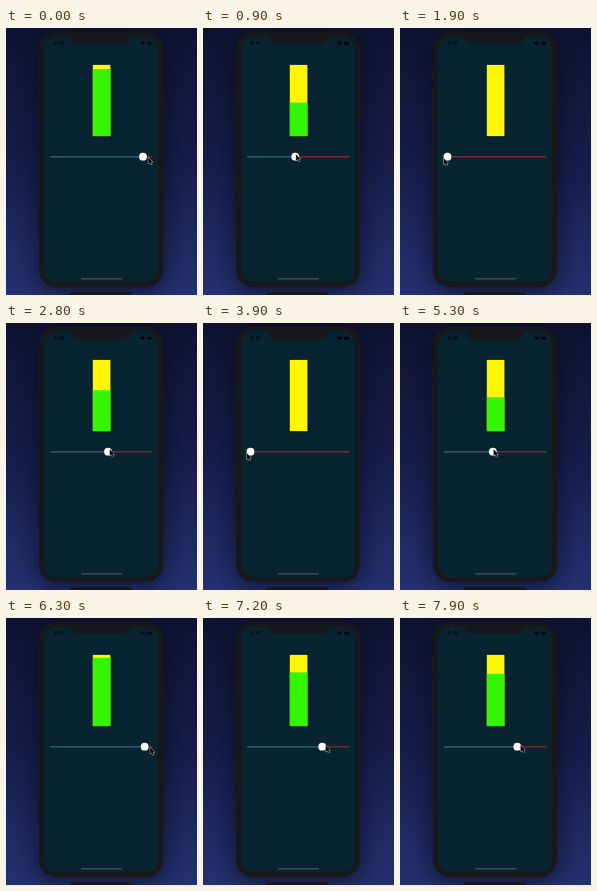
Write an HTML page with a canvas that moves like this. It is 191 px wide and 267 px high and loops after 8000 ms.

```html
<!DOCTYPE html>
<html lang="en">
<head>
<meta charset="utf-8">
<title>Slider and level bar</title>
<style>
html, body { margin: 0; width: 100%; height: 100%; overflow: hidden; background: #10143a; }
canvas { display: block; width: 191px; height: 267px; }
</style>
</head>
<body>
<canvas id="stage"></canvas>
<script>
const W = 191, H = 267, LOOP = 8000, STEP = 100;
const canvas = document.getElementById('stage');
const ratio = window.devicePixelRatio || 1;
canvas.width = W * ratio;
canvas.height = H * ratio;
const ctx = canvas.getContext('2d');
ctx.scale(ratio, ratio);

const BODY = '#17181b', INK = '#02080d';
const BAR = { x: 86.8, y: 36.9, w: 17.6, h: 71.2 };
const MIN_X = 47.5, MAX_X = 142.5, TRACK_Y = 128.7;

// turning points of the drag: time, level
const drag = [
  [0, 0.942], [1800, 0], [2000, 0], [2950, 0.647], [3800, 0], [4230, 0],
  [6450, 1], [6900, 1], [7500, 0.51], [7900, 0.735], [LOOP, 0.76]
];

// gentle ease, halfway between linear and smoothstep
const ease = u => (u + u * u * (3 - 2 * u)) / 2;

function levelAt(t) {
  const i = drag.findIndex(([time]) => time > t);
  const [t0, a] = drag[i - 1], [t1, b] = drag[i];
  return a + (b - a) * ease((t - t0) / (t1 - t0));
}

function rect(x, y, w, h, color) {
  ctx.fillStyle = color;
  ctx.fillRect(x, y, w, h);
}

function rounded(x, y, w, h, r, color) {
  ctx.beginPath();
  ctx.roundRect(x, y, w, h, r);
  ctx.fillStyle = color;
  ctx.fill();
}

function drawBackdrop() {
  const g = ctx.createLinearGradient(0, 0, 0, H);
  g.addColorStop(0, '#0e1231');
  g.addColorStop(0.5, '#151c4a');
  g.addColorStop(1, '#233171');
  rect(0, 0, W, H, g);
}

function drawStatusBar() {
  ctx.fillStyle = INK;
  ctx.font = 'bold 5px Inter, Arial, sans-serif';
  ctx.fillText('9:41', 47.5, 17.2);
  ctx.beginPath();
  ctx.moveTo(136.5, 17.5);
  ctx.arc(136.5, 17.5, 3.8, -Math.PI * 0.75, -Math.PI * 0.25);
  ctx.fill();
  rounded(141, 13.8, 5, 3, 0.8, INK);
}

function drawPhone() {
  ctx.save();
  ctx.shadowColor = 'rgba(8, 10, 24, 0.75)';
  ctx.shadowBlur = 26 * ratio;
  ctx.shadowOffsetY = 5 * ratio;
  rounded(33, 4, 124, 255, 17, BODY);
  ctx.restore();
  for (const [y, h] of [[42, 8], [60, 13], [77, 14]]) rect(32, y, 2, h, BODY);
  rect(157, 64, 1.2, 23, BODY);
  rounded(38, 9, 114, 245, 12, '#092431');
  rounded(66, 5.5, 58, 10.5, [0, 0, 5, 5], BODY);
  drawStatusBar();
  rounded(75, 250, 41, 1.6, 0.8, '#424a53');
  rounded(63, 264, 63, 10, 4, BODY);
}

function drawBar(level) {
  const green = BAR.h * level;
  rect(BAR.x, BAR.y, BAR.w, BAR.h, '#fff600');
  rect(BAR.x, BAR.y + BAR.h - green, BAR.w, green, '#34f500');
}

function drawSlider(x) {
  rounded(44, TRACK_Y - 0.7, 102.5, 1.4, 0.7, '#752833');
  rounded(44, TRACK_Y - 0.7, x - 44, 1.4, 0.7, '#26566e');
  ctx.beginPath();
  ctx.arc(x, TRACK_Y, 3.9, 0, Math.PI * 2);
  ctx.fillStyle = '#fff';
  ctx.fill();
}

// the pointer swings outwards and down towards both ends of the track
function drawPointer(thumbX) {
  const off = (thumbX - 95) / 45;
  ctx.save();
  ctx.translate(thumbX + 0.8 + off * 4.6, 126 + off * off * 3.5);
  ctx.stroke(ARROW);
  ctx.fill(ARROW);
  ctx.restore();
}

const ARROW = new Path2D('M.3 .4V6.6L1.7 5.4L2.8 7.8L3.9 7.3L2.9 5H4.7Z');

function draw(now) {
  const t = Math.floor((now % LOOP) / STEP) * STEP;
  const level = levelAt(t);
  const x = MIN_X + (MAX_X - MIN_X) * level;
  drawBackdrop();
  drawPhone();
  drawBar(level);
  drawSlider(x);
  ctx.lineJoin = 'round';
  ctx.lineWidth = 1;
  ctx.strokeStyle = '#c3bdc2';
  ctx.fillStyle = '#05080a';
  drawPointer(x);
}

let start;
function tick(now) {
  if (start === undefined) start = now;
  draw(now - start);
  requestAnimationFrame(tick);
}
draw(0);
requestAnimationFrame(tick);
</script>
</body>
</html>
```
